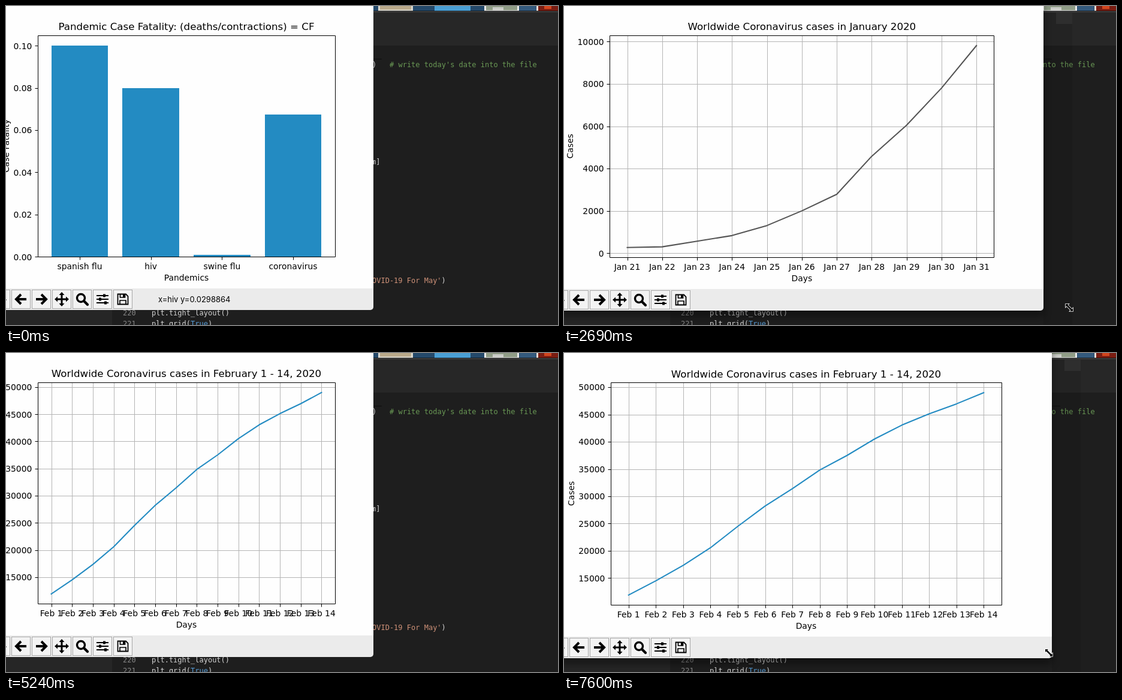
These frames come from a looping animation (921 by 532 pixels, 8 s). An HTML page:

```html
<!DOCTYPE html>
<html lang="en">
<head>
<meta charset="utf-8">
<title>Pandemic charts</title>
<style>
html, body { margin: 0; width: 100%; height: 100%; overflow: hidden; background: #1e1e1e; }
svg { display: block; width: 100vw; height: 100vh; }
text { white-space: pre; }
.plot { font: 13.89px "DejaVu Sans", sans-serif; fill: #000; }
.title { font-size: 16.67px; }
.code { font: 12px "DejaVu Sans Mono", monospace; fill: #d4d4d4; }
.status { font: 13px Inter, sans-serif; fill: #000; }
.mid { text-anchor: middle; }
.end { text-anchor: end; }
</style>
</head>
<body>
<svg viewBox="0 0 921 532" xmlns="http://www.w3.org/2000/svg">
  <defs><filter id="soft" x="-10%" y="-10%" width="120%" height="120%"><feGaussianBlur stdDeviation="7"/></filter></defs>
  <g id="desk"></g>
  <g id="win"></g>
  <g id="pointer"></g>
</svg>
<script>
const LOOP = 8000, LEFT = -27, TOP = -9, BAR = 36, BLUE = '#238bc2';
const $ = id => document.getElementById(id);
const rect = (x, y, w, h, fill, extra = '') =>
  `<rect x="${x}" y="${y}" width="${w}" height="${h}" fill="${fill}" ${extra}/>`;
const text = (x, y, s, cls, extra = '') => `<text x="${x}" y="${y}" class="${cls}" ${extra}>${s}</text>`;
const path = (d, stroke, width = 1, extra = '') =>
  `<path d="${d}" fill="none" stroke="${stroke}" stroke-width="${width}" ${extra}/>`;
const snap = v => Math.round(v) + 0.5;
const days = (month, first, n) => Array.from({ length: n }, (_, i) => `${month} ${first + i}`);

const bars = {
  title: 'Pandemic Case Fatality: (deaths/contractions) = CF',
  xlabel: 'Pandemics', ylabel: 'Case Fatality', labelW: 30.9,
  names: ['spanish flu', 'hiv', 'swine flu', 'coronavirus'],
  data: [0.1, 0.08, 0.001, 0.0674],
  ticks: [0, 0.02, 0.04, 0.06, 0.08, 0.1], digits: 2, bars: true
};
const january = {
  title: 'Worldwide Coronavirus cases in January 2020',
  xlabel: 'Days', ylabel: 'Cases', labelW: 44.2, color: '#555',
  names: days('Jan', 21, 11),
  data: [282, 314, 581, 846, 1320, 2014, 2798, 4593, 6065, 7818, 9826],
  ticks: [0, 2000, 4000, 6000, 8000, 10000], digits: 0
};
const february = {
  title: 'Worldwide Coronavirus cases in February 1 - 14, 2020',
  xlabel: 'Days', ylabel: 'Cases', labelW: 44.2, color: BLUE,
  names: days('Feb', 1, 14),
  data: [11953, 14557, 17391, 20630, 24554, 28276, 31481, 34886, 37558, 40554, 43103, 45171, 46997, 49053],
  ticks: Array.from({ length: 8 }, (_, i) => 15000 + i * 5000), digits: 0
};

// Keys are [time, value...]; cursor keys hold x and y.
const scenes = [
  { start: 0, chart: bars, size: [[0, 613, 507]], status: 'x=hiv y=0.0298864' },
  { start: 450, chart: january,
    size: [[2100, 613, 507], [2250, 642, 507], [2400, 687, 507], [2690, 800, 508], [2840, 850, 510], [2990, 872, 512]],
    cursor: [[750, 32, 20], [900, 110, 90], [1200, 440, 370], [1350, 575, 475], [1500, 605.5, 499], [1650, 608, 500],
      [2100, 608, 500], [2250, 678, 499], [2400, 738.5, 499], [2690, 843, 503], [2990, 871.5, 505],
      [3140, 872, 505], [3290, 780, 430], [3440, 360, 190], [3590, 4, 2]],
    show: [750, 3740], resize: [1500, 3290] },
  { start: 5240, chart: february,
    size: [[6720, 613, 507], [6860, 636, 507], [7010, 674, 508], [7300, 762, 508.4], [7600, 814, 509]],
    cursor: [[5390, 10, 10], [5690, 180, 150], [5990, 500, 420], [6270, 607, 499], [6420, 606, 498],
      [6720, 606, 499], [6860, 655, 500], [7010, 695, 500.5], [7310, 785, 500], [7600, 809, 500]],
    show: [5390, 8000], resize: [6270, 8000] }
];

const beats = [0, 2540, 5240, 6270, 6860, 7600];
function beat(t) {
  const base = beats.filter(b => b <= t).pop();
  return base + Math.floor((t - base) / 150) * 150;
}

function track(keys, t) {
  const i = keys.findIndex(k => k[0] > t);
  if (i === 0) return keys[0].slice(1);
  if (i < 0) return keys[keys.length - 1].slice(1);
  const a = keys[i - 1], b = keys[i], f = (t - a[0]) / (b[0] - a[0]);
  return a.slice(1).map((v, n) => v + (b[n + 1] - v) * f);
}

function layout(c, right, bottom) {
  const w = right - LEFT, h = bottom - BAR - TOP, n = c.data.length;
  const box = { x0: LEFT + w * 0.125, x1: LEFT + w * 0.9, y0: TOP + h * 0.12, y1: TOP + h * 0.89 };
  const lo = c.bars ? 0 : Math.min(...c.data), hi = Math.max(...c.data);
  const pad = (hi - lo) * 0.05, min = c.bars ? 0 : lo - pad, span = hi + pad - min;
  const edge = c.bars ? 0.4 : 0, len = (n - 1 + 2 * edge) * 1.1, x0 = (n - 1 - len) / 2;
  const step = (box.x1 - box.x0) / len, tall = box.y1 - box.y0;
  return { ...box, step,
    x: i => box.x0 + (i - x0) * step,
    y: v => box.y1 - (v - min) / span * tall,
    at: (px, py) => [Math.round((px - box.x0) / step + x0), min + (box.y1 - py) / tall * span] };
}

function drawChart(c, L) {
  const l = snap(L.x0), r = snap(L.x1), t = snap(L.y0), b = snap(L.y1);
  const cx = (L.x0 + L.x1) / 2, cy = (L.y0 + L.y1) / 2;
  const xs = c.names.map((_, i) => L.x(i)), ys = c.ticks.map(L.y);
  let s = '';
  if (c.bars) {
    c.data.forEach((v, i) => {
      const x = Math.round(xs[i] - L.step * 0.4), y = Math.round(L.y(v));
      s += rect(x, y, Math.round(xs[i] + L.step * 0.4) - x, b - y, BLUE);
    });
  } else {
    s += path(xs.map(x => `M${snap(x)} ${t}V${b}`).join('') + ys.map(y => `M${l} ${snap(y)}H${r}`).join(''), '#b5b5b5');
    s += path('M' + c.data.map((v, i) => `${xs[i]} ${L.y(v) + 0.5}`).join('L'), c.color, 2.08,
      'stroke-linejoin="round" stroke-linecap="square"');
  }
  s += path(`M${l} ${t}H${r}V${b}H${l}Z` + xs.map(x => `M${snap(x)} ${b}v5`).join('') +
    ys.map(y => `M${l} ${snap(y)}h-5`).join(''), '#000');
  xs.forEach((x, i) => s += text(x, Math.round(L.y1 + 20.6), c.names[i], 'mid'));
  ys.forEach((y, i) => s += text(L.x0 - 9.7, Math.round(y + 5.4), c.ticks[i].toFixed(c.digits), 'end'));
  s += text(cx, Math.round(L.y1 + 39.8), c.xlabel, 'mid');
  s += text(cx, Math.round(L.y0 - 8.3), c.title, 'mid title');
  const lx = Math.round(L.x0 - 17 - c.labelW);
  s += text(0, 0, c.ylabel, 'mid', `transform="translate(${lx} ${cy}) rotate(-90)"`);
  return `<g class="plot">${s}</g>`;
}

// Icons are drawn around the centre of a button.
const arrow = path('M9 0H-7M0 -8L-8 0L0 8', '#000', 4);
const head = 'M0 -12L4.5 -7H-4.5Z';
const icons = [
  path('M-9 2L0 -7L9 2', '#000', 3),
  arrow,
  `<g transform="scale(-1 1)">${arrow}</g>`,
  path('M-8 0H8M0 -8V8', '#000', 3) + [0, 90, 180, 270].map(a => `<path d="${head}" transform="rotate(${a})"/>`).join(''),
  '<circle cx="-2" cy="-2" r="6.5" fill="none" stroke="#000" stroke-width="3.4"/>' + path('M3 3L9 9', '#000', 4.2, 'stroke-linecap="round"'),
  path('M-10 -6H10M-10 0H10M-10 6H10', '#000', 1.8) + rect(1, -8.5, 4, 5, '#000') + rect(-6, -2.5, 4, 5, '#000') + rect(3, 3.5, 4, 5, '#000'),
  path('M-8.5 -8.5H5L8.5 -5V8.5H-8.5Z', '#000', 1.8) + path('M-5 8V2H5V8M-4.5 -8V-3H3.5V-8', '#000', 1.7) + rect(0, -8, 3.5, 5, '#000')
];
const toolbar = icons.map((icon, i) =>
  rect(-24.5 + i * 34, 2.5, 31, 31, '#f3f3f3', 'stroke="#a8a8a8"') +
  `<g transform="translate(${-9 + i * 34} 18)">${icon}</g>`).join('');

function drawDesk() {
  const code = (x, y, s, fill = '#d4d4d4') => text(x, y, s, 'code', `style="fill:${fill}"`);
  $('desk').innerHTML =
    rect(0, 0, 921, 532, '#1e1e1e') +
    rect(0, 0, 921, 8, '#24496a') + rect(621, 0, 58, 8, '#d9d6cc') + rect(624, 0, 52, 6, '#b9a98a') +
    rect(715, 0, 60, 8, '#4a9fd4') + rect(798, 0, 58, 8, '#e8e8e8') + rect(801, 0, 52, 7, '#8f9c86') +
    rect(812, 2, 18, 5, '#c9cbc6') + rect(857, 0, 27, 8, '#345a7d') +
    rect(885, 0, 36, 8, '#e4dcd6') + rect(888, 0, 33, 8, '#7a1d12') + rect(898, 0, 12, 5, '#d2451e') +
    rect(0, 8, 921, 1, '#0c0c0c') + rect(0, 9, 921, 1, '#5a5a5a') + rect(0, 10, 921, 56, '#272727') +
    rect(0, 500, 177, 32, '#262626') +
    code(611, 102, ')') + code(640, 102, "# write today's date into the file", '#6a9955') +
    code(610, 264, 'm]') + code(611, 462, "OVID-19 For May'", '#ce9178') + code(726.5, 462, ')') +
    code(195, 516, '220', '#858585') + code(243, 516, 'plt.tight_layout()') +
    code(195, 534, '221', '#858585') +
    code(243, 534, 'plt.grid(<tspan fill="#569cd6" style="fill:#569cd6">True</tspan>)');
}

const resizeIcon = 'M-6 -6H-1L-2.6 -4.4L4.4 2.6L6 1V6H1L2.6 4.4L-4.4 -2.6L-6 -1Z';
const arrowIcon = 'M0 0V14.5L3.4 11.4L5.7 16.6L8 15.6L5.8 10.6H10.4Z';

function render(time) {
  const scene = scenes.filter(s => s.start <= time).pop();
  const t = Math.max(beat(time), scene.start), c = scene.chart;
  const [right, bottom] = track(scene.size, t).map(Math.round);
  const L = layout(c, right, bottom), barTop = bottom - BAR;
  const seen = scene.show && t >= scene.show[0] && t < scene.show[1];
  const resizing = seen && t >= scene.resize[0] && t < scene.resize[1];
  let status = scene.status || '', pointer = '';
  if (seen) {
    const [x, y] = track(scene.cursor, t);
    if (!resizing && x > L.x0 && x < L.x1 && y > L.y0 && y < L.y1) {
      const [i, v] = L.at(x, y);
      status = `x=${c.names[i] || ''} y=${+v.toPrecision(6)}`;
    }
    pointer = `<path d="${resizing ? resizeIcon : arrowIcon}" transform="translate(${x} ${y})" stroke="#fff" stroke-width="1.6" paint-order="stroke"/>`;
  }
  const shaded = scene.show && t > scene.start;
  const shadow = shaded
    ? rect(right, 10, 48, 522, '#000', 'opacity=".09"') + rect(right + 21, 11, 27, 19, '#fff', 'opacity=".05"') +
      rect(-60, -40, right + 60, bottom + 50, '#000', 'opacity=".42" filter="url(#soft)"')
    : '';
  const frame = (y, fill) => rect(-40, y, right + 40, bottom - y, fill, 'rx="5"');
  $('win').innerHTML = shadow + rect(right, 88, 14, 1, '#0d0d0d') +
    frame(-40, '#ebebeb') + rect(-40, -40, right + 40, barTop + 40, '#fefefe') + drawChart(c, L) +
    `<g transform="translate(0 ${barTop})">${toolbar}${text(254, 23, status, 'status')}</g>`;
  $('pointer').innerHTML = pointer;
}

drawDesk();
let begin = null;
function tick(now) {
  begin ??= now;
  render((now - begin) % LOOP);
  requestAnimationFrame(tick);
}
render(0);
requestAnimationFrame(tick);
</script>
</body>
</html>
```
